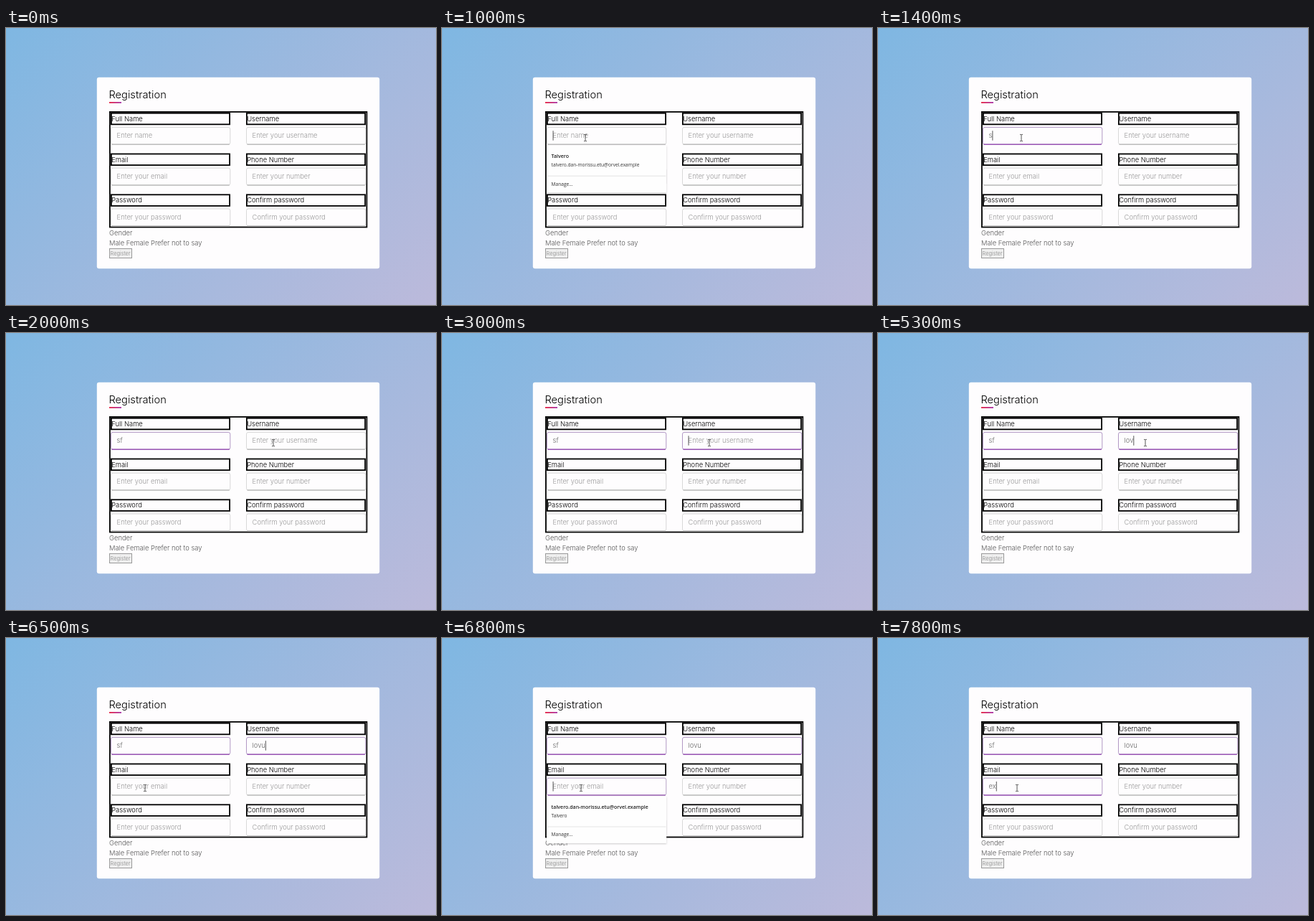
An HTML page that plays this animation: 600x386 px, repeating every 8 s.

```html
<!DOCTYPE html>
<html lang="en">
<head>
<meta charset="utf-8">
<title>Registration form</title>
<style>
  html, body { margin: 0; width: 100%; height: 100%; overflow: hidden; }
  body { background: linear-gradient(135deg, #7fb7e2, #bcbadb); }
  svg { display: block; width: 100%; height: 100%; }
  text { font: 300 9.4px Inter, "Open Sans", sans-serif; fill: #555; white-space: pre; }
  .title { font-size: 14.7px; fill: #000; }
  .label { fill: #000; }
  .hint { fill: #999; }
  .value { fill: #666; }
  .button { font-size: 7.4px; fill: #888; }
  .menu text { font: 400 6.6px "Open Sans", "Noto Sans", sans-serif; fill: #333; }
  .menu .strong { font-size: 7px; font-weight: 600; fill: #222; }
  .menu rect { filter: drop-shadow(0 1px 1px #0003); }
</style>
</head>
<body>
<svg viewBox="0 0 600 386" preserveAspectRatio="none">
  <defs>
    <linearGradient id="accent">
      <stop stop-color="#e6203f"/><stop offset="1" stop-color="#a832a8"/>
    </linearGradient>
  </defs>
  <rect x="126.8" y="68.8" width="394.4" height="266.4" rx="3" fill="#fefdfe"/>
  <text class="title" x="143.4" y="98.4">Registration</text>
  <rect x="144" y="103" width="17" height="1.8" fill="url(#accent)"/>
  <rect x="144.9" y="116.9" width="358.5" height="160.6" fill="none" stroke="#000" stroke-width="1.8"/>
  <g id="fields"></g>
  <text x="144" y="289">Gender</text>
  <text x="144" y="303">Male Female Prefer not to say</text>
  <rect x="144.5" y="307.5" width="31" height="13" fill="#efefef" stroke="#999"/>
  <text class="button" x="145.6" y="317">Register</text>
  <g id="menus"></g>
  <rect id="caret" width="0.9" height="13.5" fill="#444"/>
  <path id="pointer" d="M-2-4.6H-.6L0-4L.6-4.6H2M0-4V4M-2 4.6H-.6L0 4L.6 4.6H2"
        fill="none" stroke="#444" stroke-width=".9"/>
</svg>
<script>
const LOOP = 8000, STEP = 100, BLINK = 530, FADE = 300;
const COLUMNS = [146, 335], ROW_TOP = 117.8, ROW_GAP = 56.8;
const PERSON = "Talvero", MAIL = "talvero.dan-morissu.etu@orvel.example";
const $ = id => document.getElementById(id);

function add(parent, tag, attrs, content = "") {
  const node = document.createElementNS("http://www.w3.org/2000/svg", tag);
  for (const name in attrs) node.setAttribute(name, attrs[name]);
  node.textContent = content;
  return parent.appendChild(node);
}

function makeField(label, hint, column, row) {
  const x = COLUMNS[column], y = ROW_TOP + row * ROW_GAP, root = $("fields");
  add(root, "rect", { x: x + .9, y: y + .9, width: 165.2, height: 15.6, fill: "none", stroke: "#000", "stroke-width": 1.8 });
  add(root, "text", { class: "label", x: x + 1.2, y: y + 11.9 }, label);
  const box = add(root, "rect", { x: x + .5, y: y + 20.6, width: 166.3, height: 23.8, rx: 2.5, fill: "#fefdfe", "stroke-width": .7 });
  const base = add(root, "path", { d: `M${x + 1.5} ${y + 44.4}h164.3`, "stroke-width": 1.5 });
  const text = add(root, "text", { x: x + 8.6, y: y + 35.5 });
  return { x, y, hint, box, base, text };
}

function makeMenu(field, first, second) {
  const { x, y } = field;
  const menu = add($("menus"), "g", { class: "menu" });
  add(menu, "rect", { x, y: y + 46, width: 167.2, height: 65.4, fill: "#fefefe" });
  add(menu, "text", { class: "strong", x: x + 6.6, y: y + 63.4 }, first);
  add(menu, "text", { x: x + 6.6, y: y + 75.3 }, second);
  add(menu, "path", { d: `M${x + .5} ${y + 88.4}h166`, stroke: "#ddd", "stroke-width": .8 });
  add(menu, "text", { x: x + 6.6, y: y + 101.8 }, "Manage...");
  return menu;
}

const fields = [
  makeField("Full Name", "Enter name", 0, 0),
  makeField("Username", "Enter your username", 1, 0),
  makeField("Email", "Enter your email", 0, 1),
  makeField("Phone Number", "Enter your number", 1, 1),
  makeField("Password", "Enter your password", 0, 2),
  makeField("Confirm password", "Confirm your password", 1, 2)
];
const menus = { 0: makeMenu(fields[0], PERSON, MAIL), 2: makeMenu(fields[2], MAIL, PERSON) };

// [time, field, text]; an empty text is the click that focuses the field
const events = [
  [980, 0, ""], [1330, 0, "s"], [1430, 0, "sf"],
  [2680, 1, ""], [3480, 1, "l"], [3780, 1, "lo"], [3980, 1, "los"], [4050, 1, "losu"],
  [4780, 1, "los"], [4980, 1, "lo"], [5180, 1, "lov"], [5360, 1, "lovu"],
  [6580, 2, ""], [7180, 2, "e"], [7480, 2, "ex"]
];
// [start, end, x, y]
const moves = [[300, 300, 200, 153], [1530, 1700, 373, 153], [5400, 5700, 194, 209]];

const show = (node, on) => node.setAttribute("visibility", on ? "visible" : "hidden");
const mix = (from, to, p) => `rgb(${from.map((v, i) => Math.round(v + (to[i] - v) * p))})`;
const smooth = p => p * p * (3 - 2 * p);
const clamp = p => Math.min(1, Math.max(0, p));

function drawFields(time) {
  const past = events.filter(event => event[0] <= time);
  const last = past[past.length - 1];
  fields.forEach((field, i) => {
    const own = past.filter(event => event[1] === i);
    const value = own.length ? own[own.length - 1][2] : "";
    const focus = own.length ? smooth(clamp((time - own[0][0]) / FADE)) : 0;
    field.text.textContent = value || field.hint;
    field.text.setAttribute("class", value ? "value" : "hint");
    field.box.setAttribute("stroke", mix([200, 200, 200], [145, 110, 172], focus));
    field.base.setAttribute("stroke", mix([190, 190, 190], [155, 89, 182], focus));
    if (menus[i]) show(menus[i], last && last[1] === i && !value);
  });
  show($("caret"), last && Math.floor((time - last[0]) / BLINK) % 2 === 0);
  if (!last) return;
  const field = fields[last[1]];
  const width = last[2] ? field.text.getComputedTextLength() : 0;
  $("caret").setAttribute("x", field.x + 8.6 + width);
  $("caret").setAttribute("y", field.y + 25.4);
}

function drawPointer(time) {
  let [, , x, y] = moves[0];
  for (const [start, end, toX, toY] of moves.slice(1)) {
    const p = smooth(clamp((time - start) / (end - start)));
    x += (toX - x) * p;
    y += (toY - y) * p;
  }
  show($("pointer"), time >= moves[0][0]);
  $("pointer").setAttribute("transform", `translate(${x} ${y})`);
}

const origin = performance.now();
function frame(now) {
  const time = Math.floor(Math.max(0, now - origin) % LOOP / STEP) * STEP;
  drawFields(time);
  drawPointer(time);
  requestAnimationFrame(frame);
}
frame(origin);
</script>
</body>
</html>
```
